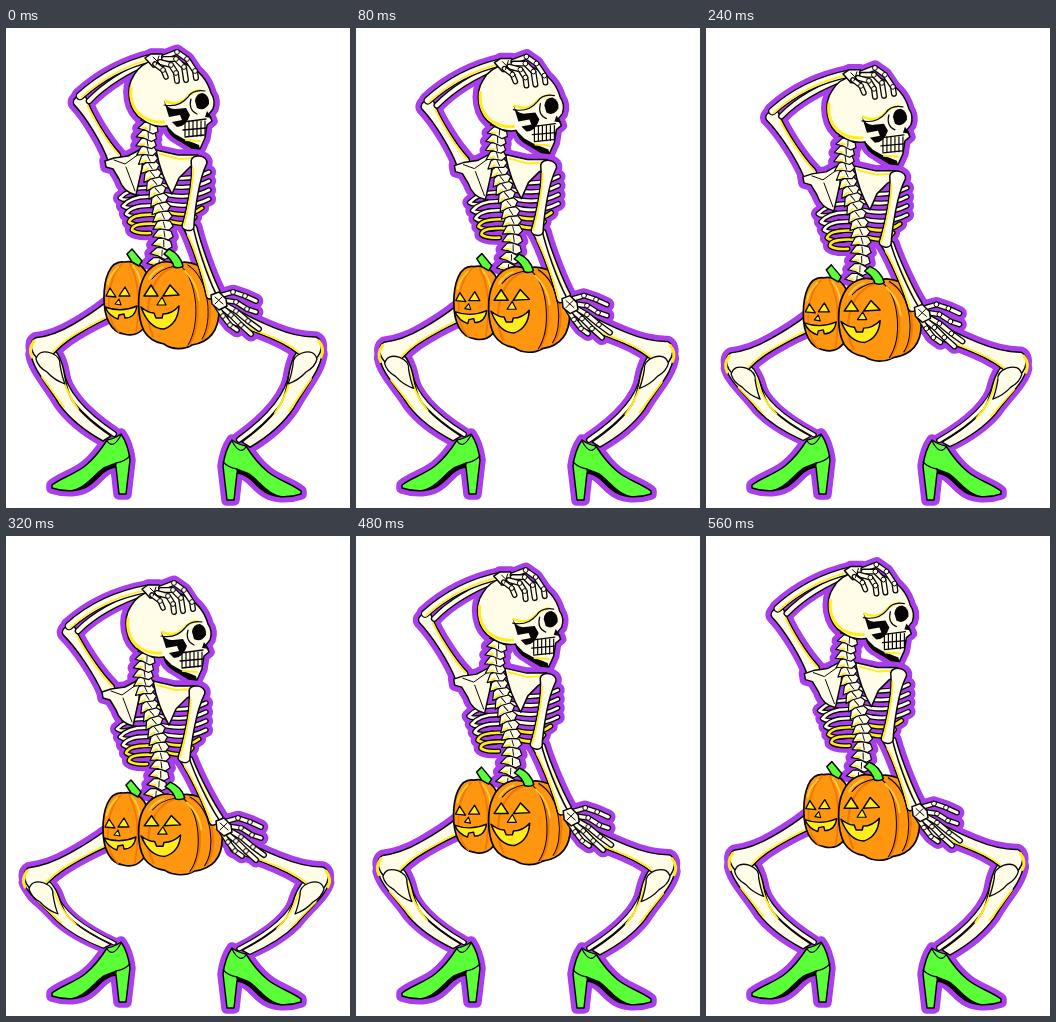
Animation of 344 by 480 pixels, one loop 0.64 s. Source, as an HTML page with a canvas:

```html
<!DOCTYPE html>
<html lang="en">
<head>
<meta charset="utf-8">
<title>Dancing skeleton</title>
<style>
html, body { margin: 0; width: 100%; height: 100%; overflow: hidden; background: #fff; }
canvas { display: block; width: 344px; height: 480px; }
</style>
</head>
<body>
<canvas id="stage" width="344" height="480"></canvas>
<script>
const ctx = document.getElementById('stage').getContext('2d');
const BONE = '#fffde8', INK = '#080505', GLOW = '#a93fec', YELLOW = '#ffec1c';
const ORANGE = '#ff960f', SHADE = '#f07800', LIGHT = '#ffc83d', GREEN = '#5aff37';
const STEP = 80;
const SQUAT = [0, .2, .44, .69, 1, .69, .44, .2];

let squat = 0, glowPass = false;
const moved = (x, y, dx, dy) => [x + dx * squat, y + dy * squat];

function stroke(path, color, width) {
  ctx.strokeStyle = color;
  ctx.lineWidth = width;
  ctx.stroke(path);
}
function shape(d, fill = BONE, width = 1.5, glow = true) {
  const path = new Path2D(d);
  if (glowPass && !glow) return;
  ctx.fillStyle = glowPass ? GLOW : fill;
  ctx.fill(path);
  stroke(path, glowPass ? GLOW : INK, glowPass ? 11.5 : width);
}
function strand(d, width, fill = BONE) {
  const path = new Path2D(d);
  if (glowPass) return stroke(path, GLOW, width + 11.5);
  stroke(path, INK, width + 2.6);
  stroke(path, fill, width);
}
function line(d, color = INK, width = 1.2) {
  if (!glowPass) stroke(new Path2D(d), color, width);
}
function blot(d, color = INK) {
  if (glowPass) return;
  ctx.fillStyle = color;
  ctx.fill(new Path2D(d));
}
function group(dx, dy, draw) {
  ctx.save();
  ctx.translate(dx, dy);
  draw();
  ctx.restore();
}

// A bone with end radii ra and rb, shaft half-width w; side places the yellow shading.
function bone([x1, y1], [x2, y2], ra, rb, w, side = 1) {
  const n = Math.hypot(x2 - x1, y2 - y1);
  group(x1, y1, () => {
    ctx.rotate(Math.atan2(y2 - y1, x2 - x1));
    shape(`M0 ${-ra}Q${n * .2} ${-w} ${n / 2} ${-w}Q${n * .8} ${-w} ${n} ${-rb}
      C${n + rb} ${-rb} ${n + rb} ${rb} ${n} ${rb}Q${n * .8} ${w} ${n / 2} ${w}
      Q${n * .2} ${w} 0 ${ra}C${-ra} ${ra} ${-ra} ${-ra} 0 ${-ra}Z`);
    const s = side * (w - 1.5);
    line(`M${n * .12} ${side * (ra * .6)}Q${n * .25} ${s} ${n * .55} ${s}
      Q${n * .8} ${s} ${n} ${side * (rb - 2)}`, YELLOW, 1.8);
  });
}

function finger(points, width = 3.4) {
  strand('M' + points.join('L'), width);
  if (glowPass) return;
  for (const [x, y] of points.slice(1, -1)) {
    ctx.beginPath();
    ctx.arc(x, y, 2.4, 0, 7);
    ctx.fillStyle = BONE;
    ctx.fill();
    ctx.strokeStyle = INK;
    ctx.lineWidth = 1;
    ctx.stroke();
  }
}

// The foot stays put while the knee sinks and moves outward.
function leg(hip, ankleY) {
  const knee = moved(36, 321, -7, 22);
  ctx.save();
  ctx.translate(0, ankleY);
  ctx.transform(1, 0, .08 * squat, (ankleY - 322 - 22 * squat) / 88, 0, 0);
  ctx.translate(0, -410);
  strand('M55 342Q60 374 108 406', 3.6);
  shape(`M25 326C27 342 43 358 53 376Q68 397 97 413L105 408Q77 389 66 372
    C58 358 60 345 55 333Q50 318 38 319Q26 319 25 326Z`);
  line('M54 338Q58 362 72 381', YELLOW, 2);
  line('M36 349Q49 367 58 379', YELLOW, 1.8);
  ctx.restore();
  bone(hip, knee, 8, 13, 5.5, -1);
  group(...knee, () => {
    line('M-8 -8Q-14 0 -10 8', YELLOW, 3);
    shape('M-6 10Q-3 0 9 4Q19 8 18 16Q20 28 23 35Q12 31 5 23Q-4 18 -6 10Z', BONE, 1.3);
  });
  group(0, ankleY - 410, shoe);
}

function shoe() {
  shape(`M46 457C55 450 69 446 79 438C90 429 96 420 101 412Q108 411 115 406
    Q122 416 124 432L120 466L113 466L110 439C101 438 95 447 86 455
    C75 465 58 464 46 460Z`, GREEN);
  blot('M60 462C77 464 88 445 98 439L111 434L110 440C102 440 95 447 86 455Q75 464 60 462Z');
  line('M101 413Q107 422 115 407M110 435Q118 434 124 428', INK, 1.3);
}

function spine() {
  const count = 17;
  for (let i = count; i >= 0; i--) {
    const t = i / count, u = 1 - t;
    const mix = (a, b, c, d) => u * u * u * a + 3 * u * u * t * b + 3 * u * t * t * c + t * t * t * d;
    group(mix(147, 126, 174, 153), mix(92, 135, 178, 235), () => {
      ctx.rotate(.4 * Math.cos(t * 6.3));
      shape('M-11 5L-7 -3L-2 -5L6 -4L9 1L5 5L-4 4Z', BONE, 1.2);
      line('M-7 3L-3 2', YELLOW, 2);
      line('M-1 -3L1 3', INK, .9);
    });
  }
}

function torso() {
  for (let i = 0; i < 6; i++) {
    const y = 147 + i * 9, inset = Math.max(0, i - 3) * 7;
    strand(`M${150 + i * 2} ${y}Q182 ${y + 8} ${203 - inset} ${y - 3}`, 2.8, i > 3 ? YELLOW : BONE);
  }
  for (let i = 0; i < 5; i++) {
    const y = 160 + i * 9;
    strand(`M${146 + i * 2.5} ${y}Q126 ${y - 2} ${114 + i * 3} ${y + 10 - i}
      Q${119 + i * 3} ${y + 14 - i} ${132 + i * 3} ${y + 9}`, 2.6, i > 2 ? YELLOW : BONE);
  }
  shape('M99 133L108 130L122 128L137 120L136 140L130 167Q117 164 113 151L107 141L100 139Z');
  line('M108 132L119 136L133 126M120 139L129 163', INK, 1);
  shape('M150 122L172 127L192 127L194 134L184 139L173 150L166 166Q155 148 150 122Z');
  line('M154 126L173 131L190 130', YELLOW, 2);
  spine();
}

function skull() {
  shape(`M137 92C122 84 119 60 128 47C137 31 160 26 180 36C195 43 202 54 205 65
    Q210 72 207 81L203 86L206 93L201 97L199 110L194 121L186 120L172 111
    Q163 107 161 98Q148 100 137 92Z`);
  line('M125 60Q123 79 137 89Q147 95 158 94', YELLOW, 3);
  line('M159 73Q171 78 179 71Q185 64 194 62', YELLOW, 2.5);
  line('M158 77Q173 80 182 69Q187 61 199 63M185 71Q182 82 191 86');
  blot('M189 73Q190 65 197 65Q204 68 203 76Q198 84 191 80Z');
  blot('M158 73Q162 82 170 81L180 80L184 87Q180 99 171 99L166 94L176 92L174 87L163 89Z');
  blot('M201 83L206 90L199 89Z');
  blot('M160 97L169 106L178 111L193 117L194 121L185 120L171 112Q162 107 160 97Z');
  line('M177 94L200 91M177 102L200 100M179 109L198 107', INK, 1.3);
  for (let x = 179; x < 200; x += 4) line(`M${x} 93L${x} 108`, INK, 1.2);
  line('M180 112L194 113', YELLOW, 2);
}

function raisedArm() {
  const elbow = moved(74, 73, -11, 22), wrist = moved(147, 32, -4, 23);
  const forearm = (dx, dy, lift) =>
    `M${elbow[0] + dx} ${elbow[1] + dy}Q${elbow[0] + 32} ${elbow[1] - lift} ${wrist[0]} ${wrist[1] + dy / 2}`;
  bone(elbow, moved(108, 129, -6, 24), 7, 7, 4.2, -1);
  strand(forearm(9, 0, 24), 4);
  strand(forearm(0, -5, 34), 6);
  line(forearm(1, -3, 32), YELLOW, 1.6);
}

function headHand() {
  shape('M139 30L145 26L156 26L163 32L157 39L147 39Z');
  finger([[158, 29], [171, 24], [181, 31], [189, 43], [190, 50]]);
  finger([[158, 31], [170, 31], [178, 39], [180, 52]]);
  finger([[154, 34], [165, 37], [170, 45], [171, 53]]);
  finger([[149, 36], [157, 42], [160, 49]], 3);
  line('M147 29L154 36M153 28L150 37', INK, 1);
}

function hipArm() {
  const elbow = moved(182, 198, -4, 24), wrist = moved(208, 267, 3, 18);
  bone([elbow[0] + 5, elbow[1] + 2], [wrist[0] + 2, wrist[1] - 3], 4, 4, 2.5);
  bone(elbow, [wrist[0] - 3, wrist[1]], 5, 5, 3);
  bone(moved(193, 134, -2, 22), elbow, 8, 6, 4.3);
  group(5 * squat, 18 * squat, () => {
    finger([[213, 268], [227, 264], [239, 268], [250, 273]], 3.2);
    finger([[216, 272], [230, 274], [241, 281], [250, 284]], 3.2);
    finger([[216, 275], [230, 283], [242, 293], [253, 301]], 3.4);
    finger([[213, 277], [225, 287], [235, 297], [245, 306]], 3.4);
    finger([[210, 277], [217, 288], [224, 297], [231, 302]], 3.2);
    shape('M205 267L213 264L220 271L221 278L213 282L206 276Z');
    line('M209 269L217 276M216 269L209 276', INK, 1);
  });
}

function smallPumpkin() {
  shape(`M118 234C103 232 98 252 98 270C98 290 105 304 118 306
    C132 310 146 300 146 270C146 246 136 231 118 234Z`, ORANGE, 1.7, false);
  line('M116 236Q101 251 103 285Q106 298 113 304M124 236Q137 260 130 304', SHADE, 1.7);
  line('M112 239Q103 248 102 256M127 238Q134 246 135 258', LIGHT, 2);
  shape('M121 226L126 221L136 233L133 238L126 234Z', GREEN, 1.5, false);
  shape('M100 268L104 260L110 269Z', YELLOW, 1.3, false);
  shape('M113 268L119 259L124 268Z', YELLOW, 1.3, false);
  shape('M109 276L113 271L115 277Z', YELLOW, 1.1, false);
  shape('M99 279Q115 285 131 278Q129 290 119 290L118 286L113 287L112 291Q103 288 99 279Z', YELLOW, 1.4, false);
}

function bigPumpkin() {
  shape(`M169 236C157 230 143 237 137 251C131 264 131 289 138 303
    C144 313 152 315 158 316C166 322 178 322 186 317C204 314 213 302 213 282
    C214 258 204 238 191 237Q180 232 169 236Z`, ORANGE, 1.7, false);
  line('M169 239C143 246 136 285 147 308M176 239C195 255 196 298 183 317M182 238C207 251 209 294 197 311', SHADE, 2.2);
  line('M175 238C193 255 194 298 182 317M182 237C204 251 207 294 196 311M169 238Q153 241 146 251', INK, 1);
  line('M143 251Q148 242 157 239M179 243Q191 255 193 272M193 242Q205 253 207 270', LIGHT, 2);
  shape('M158 226L163 221Q174 226 177 238Q173 241 168 239Q166 231 158 226Z', GREEN, 1.5, false);
  shape('M138 268L145 257L152 268Z', YELLOW, 1.5, false);
  shape('M157 268L164 257L173 267Z', YELLOW, 1.5, false);
  shape('M151 277L156 269L160 277Z', YELLOW, 1.2, false);
  shape(`M135 279Q142 285 148 285L150 290L156 290L157 286Q166 286 173 278
    Q172 296 158 301Q143 301 135 279Z`, YELLOW, 1.5, false);
}

function figure() {
  leg(moved(104, 281, 0, 20), 410);
  ctx.save();
  ctx.translate(341, 0);
  ctx.scale(-1, 1);
  leg(moved(113, 289, -2, 20), 416);
  ctx.restore();

  raisedArm();
  group(-3 * squat, 23 * squat, () => {
    torso();
    skull();
    headHand();
  });
  group(-squat, 23 * squat, smallPumpkin);
  ctx.save();
  ctx.translate(133, 236 + 24 * squat);
  ctx.scale(1 + .04 * squat, 1 - .07 * squat);
  ctx.translate(-133, -236);
  bigPumpkin();
  ctx.restore();
  hipArm();
}

function render() {
  squat = SQUAT[Math.floor(performance.now() / STEP) % SQUAT.length];
  ctx.clearRect(0, 0, 344, 480);
  ctx.lineJoin = ctx.lineCap = 'round';
  for (glowPass of [true, false]) figure();
  requestAnimationFrame(render);
}
render();
</script>
</body>
</html>
```
